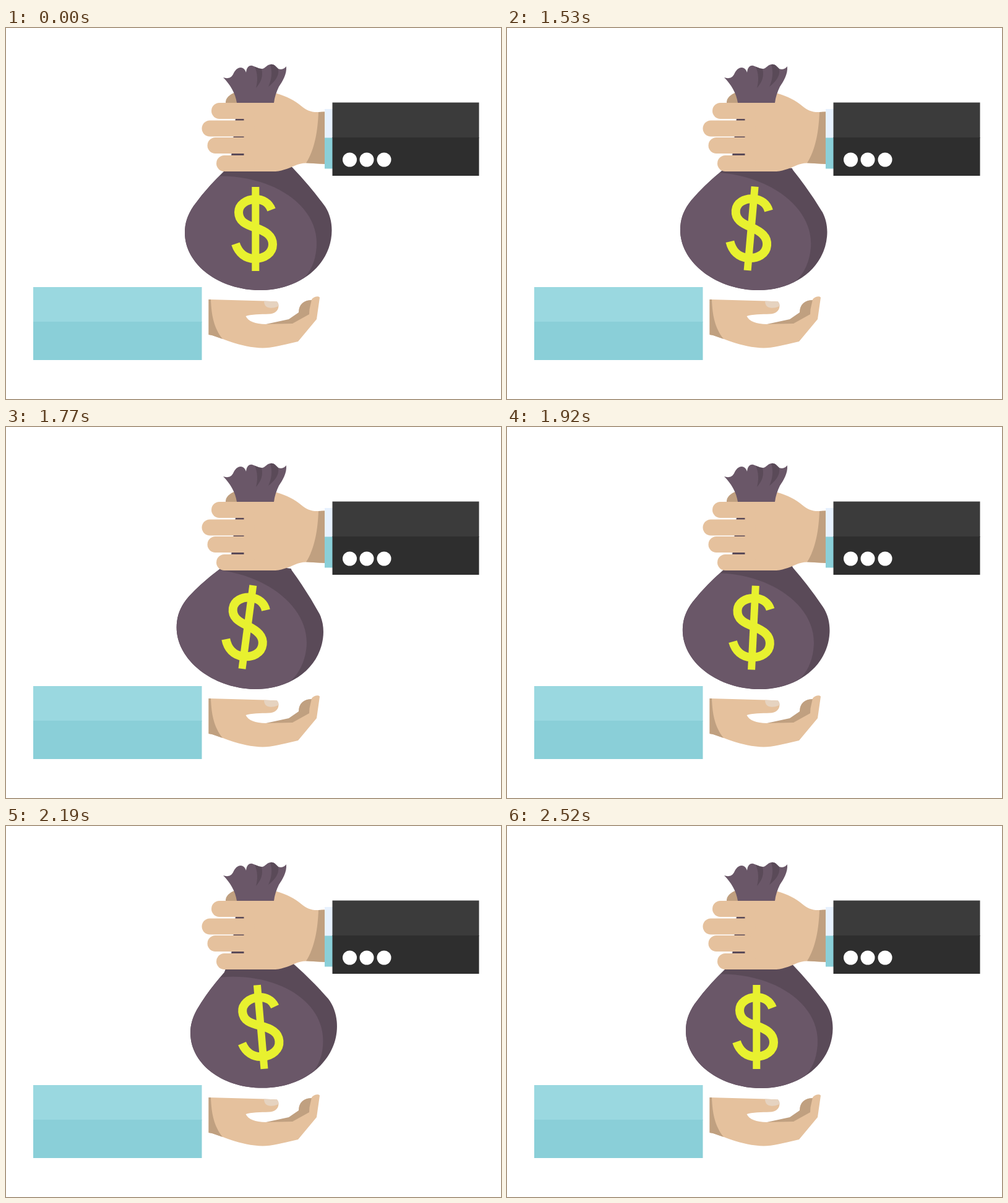
An HTML page that plays this animation: 800x600 px, repeating every 2700 ms.

```html
<!DOCTYPE html>
<html lang="en">
<head>
<meta charset="utf-8">
<title>Money bag</title>
<style>
html, body { margin: 0; width: 100%; height: 100%; overflow: hidden; background: #fff; }
svg { display: block; width: 100vw; height: 100vh; }
.skin { fill: #e5c19d; }
.shade { fill: #c0a080; }
.bag { fill: #6a5768; }
.fold { fill: #5a4a58; }
</style>
</head>
<body>
<svg viewBox="0 0 800 600">
  <!-- swinging bag -->
  <g id="bag">
    <path class="fold" d="M352 232L357 222H460.5L462.3 225Q492 256 516 289C523 300 526.5 313 526.5 327C526.5 382 476 424 411 424C345 424 289 383 289 331C289 316 293 303 303 288Q324 259 352 232Z"/>
    <path class="bag" d="M345 239.5C430 239 502 285 502 348C502 369 496 388 484 402C465 416 439 424 411 424C345 424 289 383 289 331C289 316 293 303 303 288Q322 261 345 239.5Z"/>
    <path fill="none" stroke="#e8f12f" stroke-width="14" d="M429 294C425 283 415 277 403 277C388 277 376 286 376 298C376 313 388 318 403 323C420 329 431 336 431 350C431 364 418 373 402 373C387 373 376 364 371 349"/>
    <rect x="397.3" y="257" width="12" height="136" fill="#e8f12f"/>
  </g>

  <!-- giving hand and bag neck -->
  <path class="shade" d="M355 122C354 113 362 107 371 104L376 122Z"/>
  <path class="fold" d="M371 146H386V207H364Z"/>
  <path class="skin" d="M384.5 121H432L436 105.5C455 111 466 117 477 126C485 133 493 136.5 505 136L515 135.5V220L487 218.5C471 218 462 226 450 229C443 231.5 438 232 430 232H384.5Z"/>
  <g class="skin">
    <rect x="332" y="121" width="70" height="26" rx="13"/>
    <rect x="316.5" y="149.5" width="85" height="26" rx="13"/>
    <rect x="325.5" y="177" width="76" height="26" rx="13"/>
    <rect x="340" y="206" width="62" height="26" rx="13"/>
  </g>
  <path class="shade" d="M505 136C504 165 499 197 485 218.3L515 220V135.5Z"/>
  <path class="bag" d="M373 121C371 106 362 91 351 80C357 82 363 82 367 75C371 66 377 62 383 65C386 67 387 69 388 72C389 64 392 60 398 61C404 63 409 66 414 66C420 65 421 59 428 59C434 58 436 63 440 66C445 68 450 66 453 62C454 75 447 86 441 95C437 103 434 112 433 121Z"/>
  <path class="fold" d="M402 62.5C407 75 407 86 404 97C412 88 416 78 413 66C409 66 406 64 402 62.5ZM427 59C431 72 429 84 424 95C434 87 442 78 440 66C436 63 434 58 427 59Z"/>

  <!-- dark sleeve -->
  <path fill="#e7f1fe" d="M515 131H528V178H515Z"/>
  <path fill="#8acfd8" d="M515 177.5H528V227.5H515Z"/>
  <path fill="#3b3b3b" d="M527.5 120.5H764.5V178H527.5Z"/>
  <path fill="#2e2e2e" d="M527.5 177H764.5V239H527.5Z"/>
  <g fill="#fff">
    <circle cx="555.5" cy="213" r="11.5"/>
    <circle cx="583" cy="213" r="11.5"/>
    <circle cx="611" cy="213" r="11.5"/>
  </g>

  <!-- receiving hand -->
  <path class="shade" d="M420 479L457 471L473 460C473 447 481 440 494 440L500 442L492 465L463 480Z"/>
  <path class="skin" d="M327.5 439L418 441.5L438 442.5Q441 446 440.5 450C440 458 434 462 425 462.5C412 463 395 463 387.5 466C391 474 403 479 420 479L463 478L490 463L490.5 455L494 439C497 434 506 433 507 436L502 471L472 507C450 512 430 517.5 415 517.5C390 517 365 509 348 502L333 497L327.5 496Z"/>
  <path class="shade" d="M327.5 439H331C332 465 336 485 350 503L333 497L327.5 496Z"/>
  <path fill="#e6d3c0" d="M417 441.5L438 442.5Q441 446 440 450C434 453 424 454 420 450Q417 447 417 441.5Z"/>

  <!-- blue sleeve -->
  <path fill="#9ad8e0" d="M44 419H316.5V476H44Z"/>
  <path fill="#8acfd8" d="M44 475H316.5V537H44Z"/>
</svg>
<script>
const LOOP = 2700, STEP = 30;
const swing = [[0, 0], [1358, 0], [1668, 8.6], [2226, -5], [2520, 0], [LOOP, 0]]; // ms, degrees
const bag = document.getElementById('bag');
const ease = p => (1 - Math.cos(Math.PI * p)) / 2;

function angleAt(t) {
  const i = swing.findIndex(([end]) => t < end);
  const [t0, a0] = swing[i - 1], [t1, a1] = swing[i];
  return a0 + (a1 - a0) * ease((t - t0) / (t1 - t0));
}

const start = performance.now();
function draw() {
  const t = (performance.now() - start) % LOOP;
  const angle = angleAt(Math.floor(t / STEP) * STEP);
  bag.setAttribute('transform', `rotate(${angle} 408 226)`);
  requestAnimationFrame(draw);
}
draw();
</script>
</body>
</html>
```
